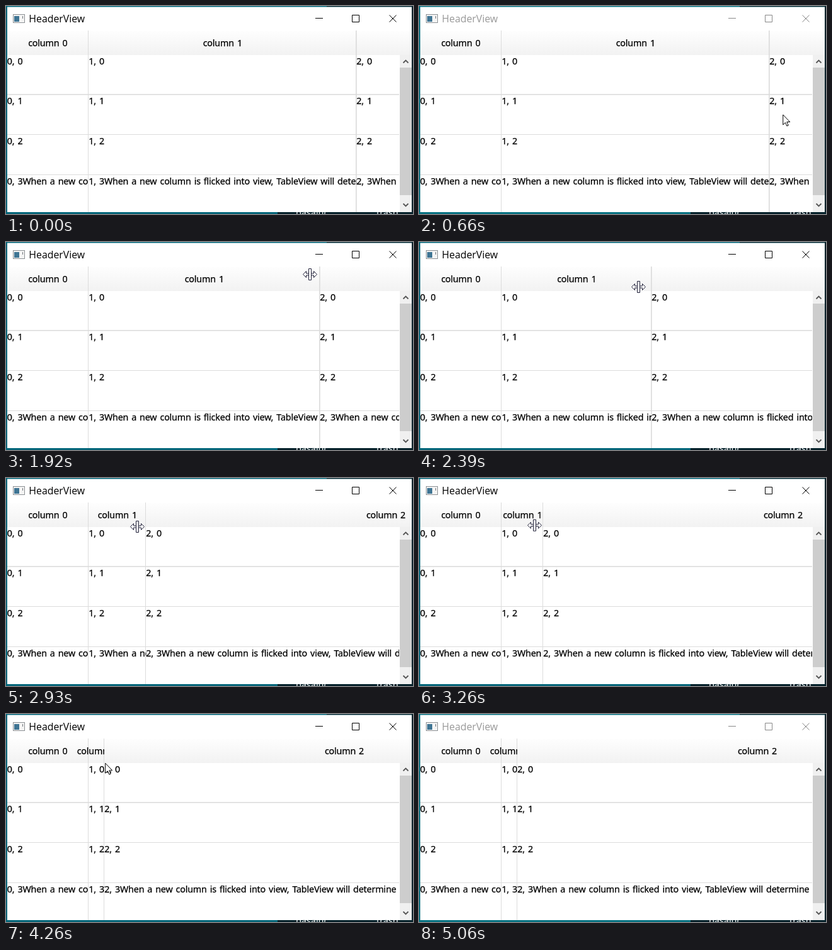
Write an HTML page that moves like this. It is 646 px wide and 331 px high and loops after 5.12 s.

```html
<!DOCTYPE html>
<html lang="en">
<head>
<meta charset="utf-8">
<title>HeaderView</title>
<style>
  html, body { margin: 0; width: 100%; height: 100%; overflow: hidden; }
  svg { display: block; width: 646px; height: 331px; }
  text { white-space: pre; }
  .ui { font: 14.3px "Noto Sans", "Open Sans", sans-serif; word-spacing: 1.5px; letter-spacing: -.18px; stroke: #000; stroke-width: .25px; }
  .mid { text-anchor: middle; }
  .title { font: 15.85px "Open Sans", "Noto Sans", sans-serif; }
  .label { font: 14.4px "Noto Sans", sans-serif; fill: #fff; }
  .line { fill: #dcdcdc; }
  .cursor path { fill: #fff; stroke: #22223a; }
</style>
</head>
<body>
<svg viewBox="0 0 646 331">
  <defs>
    <linearGradient id="headerFill" x2="0" y2="1">
      <stop stop-color="#fefefe"/><stop offset="1" stop-color="#f2f2f2"/>
    </linearGradient>
    <clipPath id="clip0"><rect x="2" y="78" width="128.5" height="250"/></clipPath>
    <clipPath id="clip1"><rect id="cell1" x="130" y="78" height="250"/></clipPath>
    <clipPath id="clip2"><rect x="2" y="78" width="622" height="250"/></clipPath>
    <clipPath id="headClip1"><rect id="head1" x="2" y="39" height="39"/></clipPath>
    <clipPath id="headClip2"><rect x="2" y="39" width="642" height="39"/></clipPath>
  </defs>

  <!-- desktop and window frame -->
  <rect id="desktop" width="646" height="331"/>
  <path d="M431 328H644V1.5H509V0H646V331H431Z" fill="#04222b"/>
  <text class="label" x="460" y="333.5">basaltic</text>
  <text class="label" x="588" y="333.5">trash</text>
  <rect x="2" y="1.5" width="642" height="326.5" fill="#fff"/>

  <!-- title bar -->
  <rect x="11.5" y="13.5" width="18" height="13" fill="#f4f4f4" stroke="#8c9094"/>
  <rect x="13" y="16" width="8" height="9" fill="#3f7594"/>
  <path d="M26.5 16V20" stroke="#6d7478"/>
  <text id="title" class="title" x="36.3" y="25.5">HeaderView</text>
  <path id="buttons" d="M491 19.5H503M549.5 14.5H560.5V25.5H549.5ZM608.5 14.5L619.5 25.5M619.5 14.5L608.5 25.5" fill="none"/>

  <!-- header and table -->
  <rect x="2" y="39" width="642" height="39" fill="url(#headerFill)"/>
  <g class="line">
    <rect x="2" y="140" width="622" height="1.6"/>
    <rect x="2" y="204" width="622" height="1"/>
    <rect x="2" y="268" width="622" height="1"/>
    <rect x="130" y="39" width="1" height="289"/>
    <rect id="edge" y="39" height="289"/>
  </g>
  <text class="ui mid" x="66.3" y="64">column 0</text>
  <g clip-path="url(#headClip1)"><text id="label1" class="ui mid" y="64">column 1</text></g>
  <g clip-path="url(#headClip2)"><text id="label2" class="ui mid" y="64">column 2</text></g>
  <g clip-path="url(#clip0)"><g id="col0" transform="translate(1.8)"></g></g>
  <g clip-path="url(#clip1)"><g id="col1" transform="translate(131.2)"></g></g>
  <g clip-path="url(#clip2)"><g id="col2"></g></g>

  <!-- scroll bar -->
  <rect x="625" y="78" width="19" height="250" fill="#f0f0f0"/>
  <rect x="625" y="98" width="19" height="203" fill="#cdcdcd"/>
  <path d="M630.5 90.5L634.5 86.5L638.5 90.5M630.5 314.5L634.5 318.5L638.5 314.5" fill="none" stroke="#555" stroke-width="1.8"/>

  <g id="arrow" class="cursor">
    <path d="M.5 .5V16.5L4.2 13L6.6 18.5L9 17.5L6.6 12H11.5Z" style="stroke:#000"/>
  </g>
  <g id="split" class="cursor">
    <path d="M-2 -1.5H-6V-5L-11 0L-6 5V1.5H-2ZM2 -1.5H6V-5L11 0L6 5V1.5H2Z"/>
    <path d="M-2 -9H2V9H-2Z"/>
  </g>
</svg>
<script>
const LOOP = 5120, STEP = 66.55, LAG = 10;   // the picture advances in even steps
const FIRST_EDGE = 556;
const $ = id => document.getElementById(id);
const set = (id, attrs) => {
  for (const name in attrs) $(id).setAttribute(name, attrs[name]);
};

// Pointer waypoints: step, x, y
const approach = [[2, 622, 318], [6, 590, 213], [8, 590, 213], [16, 539, 51], [19, 556, 51.5]];
const leave = [[63, 143, 69], [68, 498, 288]];
// While dragging, the last value is the column edge
const drag = [[24, 556, 51.5, FIRST_EDGE], [29, 482.5, 51.5, 498], [36, 348.5, 71.5, 369],
  [44, 208.5, 77.5, 222], [53, 163.5, 73.5, 177], [54, 163.5, 73.5, 177], [56, 142.5, 69.5, 156]];

function along(points, step, power = 1) {
  let i = 1;
  while (i < points.length - 1 && step > points[i][0]) i++;
  const [from, ...a] = points[i - 1], [to, ...b] = points[i];
  const u = Math.min(1, Math.max(0, (step - from) / (to - from))) ** power;
  return a.map((v, n) => v + (b[n] - v) * u);
}

const sentence = "When a new column is flicked into view, TableView will determine its width";
for (let col = 0; col < 3; col++) {
  $("col" + col).innerHTML = [0, 1, 2, 3].map(row =>
    `<text class="ui" y="${93 + Math.floor(row * 63.8)}">${col}, ${row}${row === 3 ? sentence : ""}</text>`).join("");
}

function placePointer(step, dragX, dragY) {
  const resizing = step >= 18 && step < 64;
  const pointing = (step > 2 && step < 18) || (step >= 64 && step < 69);
  const [x, y] = step < 24 ? along(approach, step)
    : resizing ? [dragX, dragY] : along(leave, step, 2);
  const place = { transform: `translate(${x} ${y})` };
  set("split", { ...place, visibility: resizing ? "visible" : "hidden" });
  set("arrow", { ...place, visibility: pointing ? "visible" : "hidden" });
}

function draw(time) {
  const t = time % LOOP;
  const step = Math.floor((t + LAG) / STEP);
  const active = t < 130 || (t >= 1460 && t < 5060);
  set("desktop", { fill: active ? "#00667a" : "#077383" });
  set("title", { fill: active ? "#000" : "#999" });
  set("buttons", { stroke: active ? "#000" : "#888" });

  const [dragX, dragY, dragEdge] = along(drag, step);
  const edge = Math.round(dragEdge);
  set("edge", { x: edge - 1, width: edge > 300 ? 1.7 : 1 });
  set("cell1", { width: edge - 129.5 });
  set("head1", { width: edge - 2 });
  set("label1", { x: (131 + edge) / 2 + .3 });
  set("label2", { x: edge + 381 });
  set("col2", { transform: `translate(${edge + .3})` });
  placePointer(step, dragX, dragY);
}

const start = performance.now();
function tick() {
  draw(performance.now() - start);
  requestAnimationFrame(tick);
}
tick();
</script>
</body>
</html>
```
